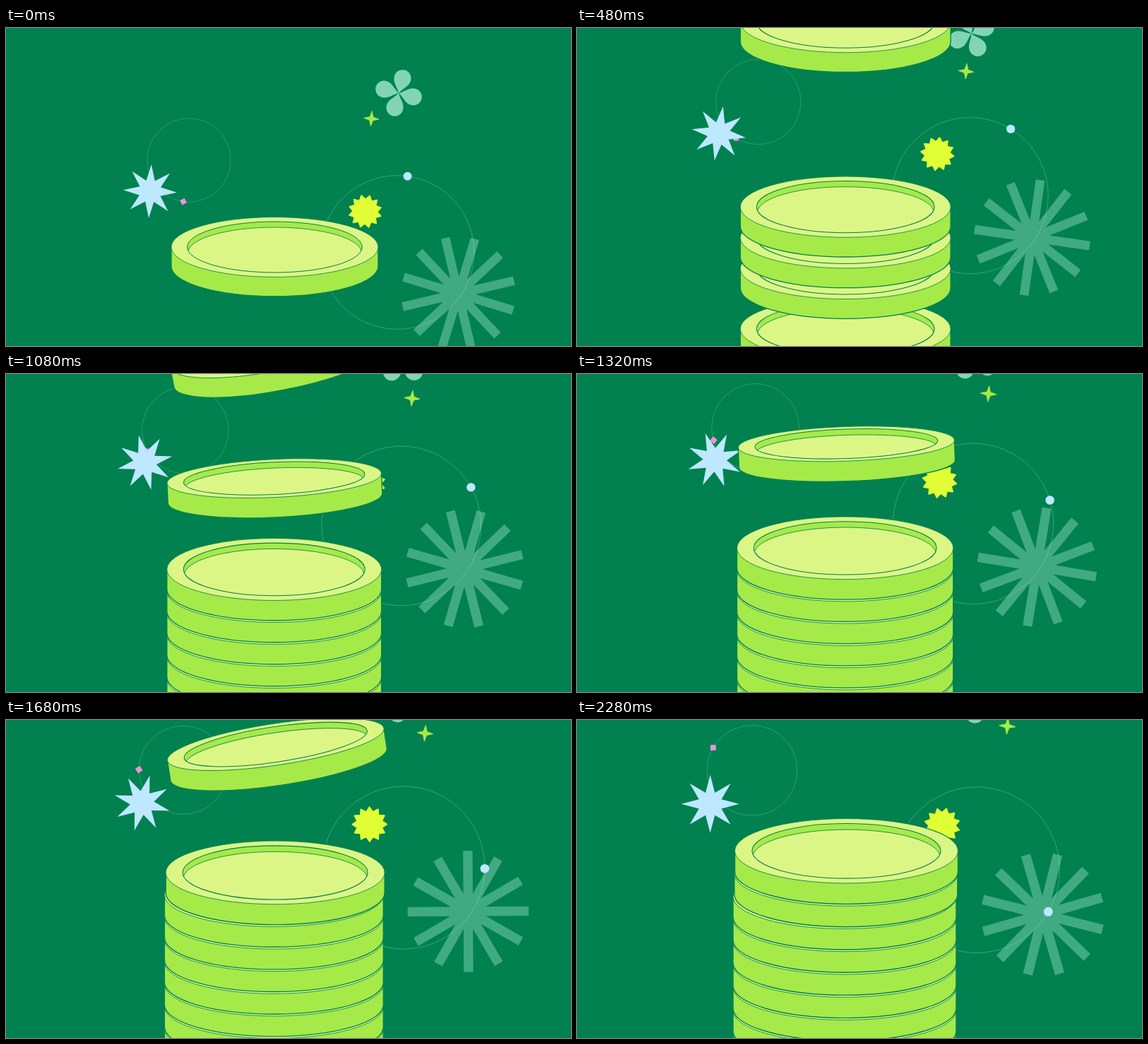
An HTML page with a canvas that plays this animation: 800 px wide and 450 px high, repeating every 2.52 s.

```html
<!DOCTYPE html>
<html lang="en">
<head>
<meta charset="utf-8">
<title>Coin stack</title>
<style>
html, body { margin: 0; width: 100%; height: 100%; overflow: hidden; background: #00814f; }
canvas { display: block; width: 800px; height: 450px; }
</style>
</head>
<body>
<canvas id="stage" width="800" height="450"></canvas>
<script>
const ctx = document.getElementById('stage').getContext('2d');
const LOOP = 2520, STEP = 120, LAST = 2280;
const BG = '#00814f', SIDE = '#a5ea49', FACE = '#dcf686', SKY = '#bde8ff';
const YELLOW = '#e0ff35';
const TAU = Math.PI * 2, RAD = Math.PI / 180;
const PITCH = 29.9;

const clamp = u => Math.max(0, Math.min(1, u));
const smooth = u => u * u * (3 - 2 * u);
const decay = t => Math.exp(-t / 320);

// Camera: a quick rise, a slow drift, then a small settling.
const pan = t => 101 * (1 - decay(t)) + 0.0043 * t - 6.3 * smooth(clamp((t - 1920) / 360));
const spin = t => 0.0258 * (LAST - t) + 34 * decay(t);
const base = t => 85 + 111.2 * (1 - (1 - clamp(t / 480)) ** 3) + 0.0027 * t;

// Lowest coin first. land: ms, speed: px per ms, lean: degrees per px of height,
// level: height where it lies flat, dip and span: how it flips towards the viewer.
const plain = { lean: 0, level: 0, dip: 0, span: 1, dx: 0 };
const coins = [
  ...[0, 1, 2].map(i => ({ land: 540 + 14.5 * i, speed: 0.9 })),
  { land: 790, speed: 1.25 },
  { land: 907, speed: 0.65 },
  { land: 1239, speed: 0.593, lean: 0.016, level: -73, dip: 0.41, span: 240 },
  { land: 1521, speed: 0.553, lean: 0.068, level: 82, dip: 0.48, span: 290, dx: 1.7 },
  { land: 2113, speed: 0.327, lean: 0.108, level: 63, dip: 0.8, span: 1000, dx: 2.3 }
].map(c => ({ ...plain, ...c }));

function at(x, y, deg, draw) {
  ctx.save();
  ctx.translate(x, y);
  ctx.rotate(deg * RAD);
  draw();
  ctx.restore();
}

function oval(y, rx, ry) {
  ctx.beginPath();
  ctx.ellipse(0, y, rx, ry, 0, 0, TAU);
}

function fill(color) {
  ctx.fillStyle = color;
  ctx.fill();
}

function line(color, width) {
  ctx.strokeStyle = color;
  ctx.lineWidth = width;
  ctx.stroke();
}

// Angles run clockwise from the top.
const orbit = (x, y, r, deg) => [x + r * Math.sin(deg * RAD), y - r * Math.cos(deg * RAD)];

function star(n, outer, inner) {
  ctx.beginPath();
  for (let i = 0; i < n * 2; i++) {
    ctx.lineTo(...orbit(0, 0, i % 2 ? inner : outer, i * 180 / n));
  }
  ctx.closePath();
}

function ring(x, y, r, color, width, dash) {
  ctx.beginPath();
  ctx.arc(x, y, r, 0, TAU);
  ctx.setLineDash(dash);
  line(color, width);
  ctx.setLineDash([]);
}

function clover() {
  for (let i = 0; i < 4; i++) {
    ctx.beginPath();
    ctx.moveTo(0, 0);
    ctx.bezierCurveTo(-4, -8, -12, -12, -12, -21.5);
    ctx.arc(0, -21.5, 12, Math.PI, TAU);
    ctx.bezierCurveTo(12, -12, 4, -8, 0, 0);
    fill('#81d5b5');
    ctx.rotate(Math.PI / 2);
  }
}

function spokes() {
  ctx.beginPath();
  for (let i = 0; i < 12; i++) {
    ctx.moveTo(0, 0);
    ctx.lineTo(...orbit(0, 0, 81, i * 30));
  }
  line('#40aa83', 12.6);
}

function sparkle() {
  star(4, 10.8, 3.4);
  fill(SIDE);
  line(SIDE, 0.8);
}

function coin(x, y, tilt, squash) {
  const rx = 146.5, ry = 42.4 * squash, thick = 27.3;
  const ix = 123.8, iy = 36 * squash;
  at(x, y, tilt, () => {
    ctx.beginPath();
    ctx.ellipse(0, 0, rx, ry, 0, Math.PI, TAU);
    ctx.lineTo(rx, thick);
    ctx.ellipse(0, thick, rx, ry, 0, 0, Math.PI);
    ctx.closePath();
    fill(SIDE);
    line(BG, 1.3);
    oval(0, rx, ry);
    fill(FACE);
    line(BG, 0.8);
    oval(0, ix, iy);
    fill(SIDE);
    ctx.save();
    ctx.clip();
    oval(8, ix - 0.8, iy);
    fill(FACE);
    line(BG, 0.8);
    ctx.restore();
    oval(0, ix, iy);
    line(BG, 1);
  });
}

function scenery(t) {
  const turn = spin(t), lap = 7.7 + 0.0494 * t;
  at(156, -133, turn + 12, clover);
  at(...orbit(156, -133, 53, turn + 134), 5, sparkle);
  at(240.5, 151, turn + 14, spokes);
  ring(154, 92.5, 108.7, 'rgba(200,238,220,0.85)', 0.9, [1, 1.6]);
  at(...orbit(154, 92.5, 108.7, lap), 0, () => { oval(0, 6, 6); fill(SKY); });
  ring(-141, -38, 59.2, 'rgba(160,225,190,0.38)', 0.7, []);
  at(...orbit(-141, -38, 59.2, lap + 180), lap - 33.5, () => {
    ctx.fillStyle = '#f58fe0';
    ctx.fillRect(-3.6, -3.6, 7.2, 7.2);
  });
  at(-196, 6, turn, () => { star(8, 38, 16); fill(SKY); });
  at(108.5, 34.5, turn + 14, () => {
    star(12, 23, 17);
    fill(YELLOW);
    line(YELLOW, 1.8);
  });
}

function stack(t) {
  const floor = base(t);
  coin(-19.5, floor, 0, 1);
  coins.forEach((c, i) => {
    const gap = Math.max(0, c.speed * (c.land - t));
    const tilt = -c.lean * (gap - c.level) * clamp(gap / 40);
    const squash = 1 - c.dip * Math.sin(Math.PI * clamp(gap / c.span));
    coin(-19.5 + c.dx, floor - PITCH * (i + 1) - gap, tilt, squash);
  });
}

function draw(t) {
  const zoom = 1 + 0.0785 * t / LAST;
  ctx.setTransform(1, 0, 0, 1, 0, 0);
  ctx.fillStyle = BG;
  ctx.fillRect(0, 0, 800, 450);
  ctx.translate(400, 225);
  ctx.scale(zoom, zoom);
  ctx.lineJoin = 'round';
  at(0, -pan(t), 0, () => scenery(t));
  stack(t);
}

const start = performance.now();
function tick() {
  const t = (performance.now() - start) % LOOP;
  draw(Math.min(LAST, Math.floor(t / STEP) * STEP));
  requestAnimationFrame(tick);
}
tick();
</script>
</body>
</html>
```
